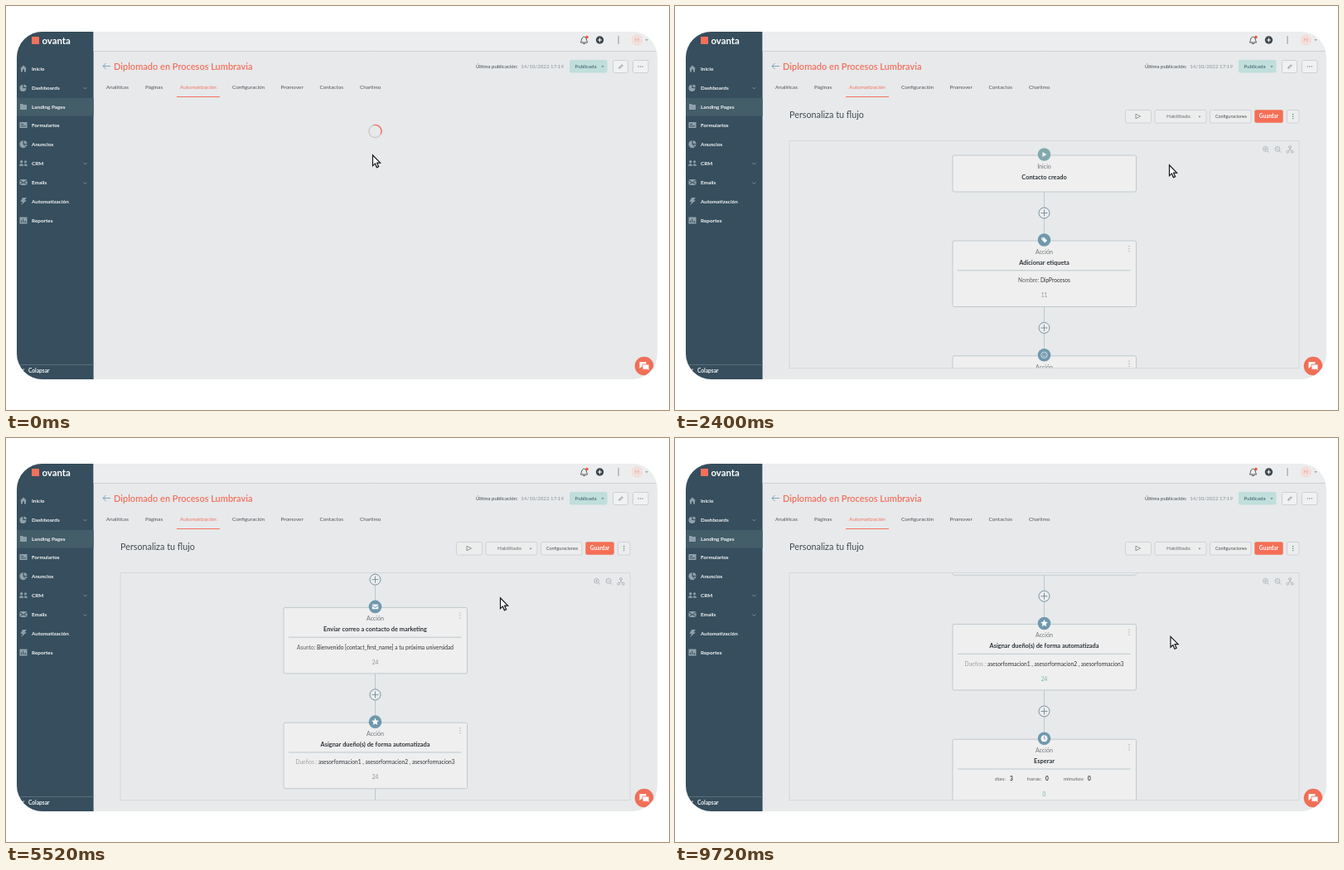
Write an HTML page with a canvas that moves like this. It is 800 by 487 pixels and loops after 9.8 s.

```html
<!DOCTYPE html>
<html lang="es">
<head>
<meta charset="utf-8">
<style>
  html, body { margin: 0; width: 100%; height: 100%; overflow: hidden; background: #fff; }
  canvas { display: block; width: 800px; height: 487px; }
</style>
</head>
<body>
<canvas id="stage"></canvas>
<script>
const LOOP = 9800, LOADED = 240, WHEEL = 118.7, WHEEL_MS = 150;
const WHEEL_TIMES = [2700, 3980, 5140, 7130];
const ORANGE = '#f4705a', DARK = '#2e3338', GREY = '#71767b', BLUE = '#6f98ad', PALE = '#e7e9eb';
const CX = 445.5;

// Cursor tip: time, x, y
const CURSOR = [
  [0, 442, 179], [400, 442, 179], [520, 453, 181], [760, 560, 187], [1000, 596, 191],
  [5000, 596, 191], [5400, 596, 192], [6700, 596, 192], [7120, 597.3, 212.6], [7680, 597.5, 222],
  [8320, 597.5, 222], [8640, 597.5, 226], [8920, 597.5, 228], [9120, 597.5, 229.5],
  [9400, 597.5, 231.5], [9680, 597.5, 231.5], [9720, 597.5, 238.6], [LOOP, 597.5, 238.6]
];

const MENU = [
  ['Inicio', 75.5, 'M-4 0L0 -4L4 0H3V4H1V1H-1V4H-3V0Z'],
  ['Dashboards', 98.5, 'M-.6 -3.5V.6H3.5A4 4 0 1 1 -.6 -3.5ZM.6 -4A4 4 0 0 1 4 -.6H.6Z'],
  ['Landing Pages', 121.5, 'M-4 -3.5H-1L0 -2.5H4V3.5H-4Z'],
  ['Formularios', 143.5, 'M-4.5 -3.5H4.5V3.5H-4.5ZM-3 -1.5V-.5H0V-1.5ZM-3 .8V1.8H3V.8Z'],
  ['Anuncios', 166.5, 'M-.5 -4.5V0L3 3.5A4.6 4.6 0 1 1 -.5 -4.5ZM.7 -4.5A4.6 4.6 0 0 1 4.6 -.6H.7ZM1 .5H4.6A4.6 4.6 0 0 1 3.5 3Z'],
  ['CRM', 189.5, 'M-4 -1.7A1.7 1.7 0 1 1 -.6 -1.7A1.7 1.7 0 1 1 -4 -1.7ZM1 -1.7A1.5 1.5 0 1 1 4 -1.7A1.5 1.5 0 1 1 1 -1.7ZM-5 3.3C-5 0 .3 0 .3 3.3ZM1.2 3.3V1C3 .3 5 1 5 3.3Z'],
  ['Emails', 212.5, 'M-4.5 -3.5L0 .3L4.5 -3.5ZM-4.5 -2.3V3L-1.6 .2ZM4.5 -2.3V3L1.6 .2ZM-4 3.5L-1 .8L0 1.6L1 .8L4 3.5Z'],
  ['Automatización', 235.5, 'M-1 -4.5H4L1.5 -1.2H4L-3 4.8L-.8 .6H-3.5Z'],
  ['Reportes', 258.5, 'M-4.5 -4H4.5V4H-4.5ZM-3 0V2.5H-2V0ZM-.8 -2V2.5H.2V-2ZM1.5 .8V2.5H3V.8Z']
];
const TABS = [['Analíticas', 121], ['Páginas', 168], ['Automatización', 210], ['Configuración', 273],
  ['Promover', 331.5], ['Contactos', 378.5], ['Charlimo', 427]];

const GLYPH = {
  play: 'M-2 -3L3 0L-2 3Z',
  tag: 'M-3.6 -2.6L-.4 -3.2L3.6 .8L.8 3.6L-3.2 -.4Z',
  mail: 'M-3.8 -2.2L0 .6L3.8 -2.2V-2.8H-3.8ZM-3.8 -1.1V2.8H3.8V-1.1L0 1.7Z'
};
const CARDS = [
  { y: 179, kind: 'play', head: 'Inicio', title: 'Contacto creado' },
  { kind: 'tag', title: 'Adicionar etiqueta', parts: [['Nombre: ', '#5b6065'], ['DipProcesos', DARK]], count: '11' },
  { kind: 'smile', title: 'Crear oportunidad', parts: [['Nombre: ', '#5b6065'], ['Diplomado en Procesos', DARK]], count: '11' },
  { kind: 'mail', title: 'Enviar correo a contacto de marketing',
    parts: [['Asunto: ', '#5b6065'], ['Bienvenido [contact_first_name] a tu próxima universidad', DARK]], count: '24' },
  { kind: 'star', title: 'Asignar dueño(s) de forma automatizada',
    parts: [['Dueños : ', '#9ca1a5'], ['asesorformacion1 , asesorformacion2 , asesorformacion3', DARK]], count: '24' },
  { kind: 'clock', title: 'Esperar', waits: [['días:', 386, '3', 404], ['horas:', 425, '0', 447], ['minutos:', 469, '0', 498]], count: '0' }
];
CARDS.forEach((card, i) => { if (i) card.y = 282 + (i - 1) * 138.75; });

const canvas = document.getElementById('stage');
const ctx = canvas.getContext('2d');
const dpr = window.devicePixelRatio || 1;
canvas.width = 800 * dpr;
canvas.height = 487 * dpr;

const clamp = v => Math.max(0, Math.min(1, v));
const easeOut = u => 1 - (1 - u) ** 2;

function text(str, x, y, size, color, { weight = 400, align = 'left' } = {}) {
  ctx.font = `${weight} ${size}px Lato, "Open Sans", sans-serif`;
  ctx.textAlign = align;
  ctx.fillStyle = color;
  ctx.fillText(str, x, y + size * 0.35);
  return ctx.measureText(str).width;
}

function rect(x, y, w, h, fill, stroke, radius = 0) {
  ctx.beginPath();
  ctx.roundRect(x, y, w, h, radius);
  if (fill) { ctx.fillStyle = fill; ctx.fill(); }
  if (stroke) { ctx.strokeStyle = stroke; ctx.lineWidth = 1; ctx.stroke(); }
}

function line(color, width, ...points) {
  ctx.beginPath();
  for (let i = 0; i < points.length; i += 2) ctx.lineTo(points[i], points[i + 1]);
  ctx.strokeStyle = color;
  ctx.lineWidth = width;
  ctx.stroke();
}

function circle(x, y, r, fill, stroke, width = 1) {
  ctx.beginPath();
  ctx.arc(x, y, r, 0, Math.PI * 2);
  if (fill) { ctx.fillStyle = fill; ctx.fill(); }
  if (stroke) { ctx.strokeStyle = stroke; ctx.lineWidth = width; ctx.stroke(); }
}

function shape(d, x, y, fill, stroke, width = 1) {
  ctx.save();
  ctx.translate(x, y);
  const path = new Path2D(d);
  if (fill) { ctx.fillStyle = fill; ctx.fill(path, 'evenodd'); }
  if (stroke) { ctx.strokeStyle = stroke; ctx.lineWidth = width; ctx.stroke(path); }
  ctx.restore();
}

const caret = (x, y, color) => shape('M-1.5 -.7H1.5L0 1Z', x, y, color);
const chevron = (x, y, color) => line(color, 0.8, x - 2, y - 1, x, y + 1, x + 2, y - 1);

function dots(x, y, dx, dy, color) {
  for (let i = -1; i <= 1; i++) circle(x + i * dx, y + i * dy, 0.7, color);
}

function plus(x, y, arm, color, width) {
  line(color, width, x - arm, y, x + arm, y);
  line(color, width, x, y - arm, x, y + arm);
}

function drawSidebar() {
  rect(13, 31, 92.6, 419, '#364e5d');
  rect(13, 111, 92.6, 21.5, '#435d69');
  rect(31, 37, 9, 9, ORANGE);
  text('ovanta', 43.5, 42, 11.4, '#fff', { weight: 700 });
  for (const [label, y, icon] of MENU) {
    shape(icon, 21, y, '#8fa0aa');
    text(label, 31, y, 6.4, '#f4f6f7', { weight: 700 });
  }
  for (const y of [99, 190, 213.5]) chevron(95.5, y, '#8fa0aa');
  line('#5a707c', 1, 13, 432.5, 105.6, 432.5);
  line('#fff', 1, 22, 437.5, 19, 440, 22, 442.5);
  text('Colapsar', 27, 440, 6.6, '#f4f6f7', { weight: 700 });
}

function drawHeader() {
  rect(105.6, 31, 680.4, 23, '#ecedee');
  line('#cfd1d3', 1, 105.6, 54.5, 786, 54.5);
  shape('M-4.2 3C-2.6 1.5 -3.6 -3.6 0 -3.8C3.6 -3.6 2.6 1.5 4.2 3ZM-1.2 4.5H1.2', 697.5, 41, null, '#4b5359');
  circle(701, 37.5, 1.7, '#f0503c');
  circle(716.5, 41, 4.7, '#3d464c');
  plus(716.5, 41, 2.4, '#fff', 1.1);
  line('#8f9498', 1, 739, 36, 739, 46);
  circle(761.5, 41, 6.8, '#f2dfda');
  text('FE', 761.5, 41, 5.2, '#efa493', { align: 'center' });
  caret(773, 41, '#7b8084');

  line('#7ba5b8', 1, 126, 72.5, 117, 72.5);
  line('#7ba5b8', 1, 120.5, 69, 117, 72.5, 120.5, 76);
  text('Diplomado en Procesos Lumbravia', 130, 73, 11, ORANGE, { weight: 600 });
  text('Última publicación:', 567, 73, 6, '#51565b', { weight: 500 });
  text('14/10/2022 17:19', 673, 73, 6.2, '#8b9094', { align: 'right' });
  rect(680, 65, 45.5, 15.5, '#c0dedb', null, 2);
  text('Publicada', 699.5, 72.5, 6, '#557a82', { weight: 700, align: 'center' });
  caret(720, 73, '#557a82');
  rect(732.5, 65.5, 18, 15, '#f0f1f1', '#cdd1d4', 2);
  shape('M-2.4 1.8L1.4 -2A1 1 0 0 1 2.6 -.8L-.4 2.2A.8 .8 0 0 1 -1.4 1L1 -1.2', 741.5, 73, null, '#7c8388', 0.7);
  rect(756.5, 65.5, 18.5, 15, '#f0f1f1', '#cdd1d4', 2);
  dots(765.7, 73, 2.5, 0, '#7c8388');

  for (const [label, x] of TABS) text(label, x, 98, 6.4, x === 210 ? ORANGE : '#50555a');
  line(ORANGE, 1, 206, 109.5, 258, 109.5);
}

function drawChatButton() {
  circle(770, 434, 11.3, '#f06f57');
  shape('M-5.5 -5H2.5V1H-3L-5.5 3Z', 770, 434, '#fff');
  shape('M-2 -2H6V6L4 4.2H-2Z', 770, 434, '#fff', '#f06f57', 0.9);
}

function drawSpinner(t) {
  const turn = t / 1000 * Math.PI * 2;
  circle(CX, 151, 7.6, null, '#cfc3c2', 1.3);
  ctx.beginPath();
  ctx.arc(CX, 151, 7.6, turn - 1.8, turn + 0.5);
  ctx.strokeStyle = ORANGE;
  ctx.lineWidth = 1.4;
  ctx.stroke();
}

function drawToolbar() {
  const button = (x, w) => rect(x + 0.5, 125.5, w, 15.5, '#eceded', '#cfd3d5', 2);
  text('Personaliza tu flujo', 138, 131, 10.8, '#444a50');
  button(543, 31);
  shape('M-2.5 -2.8L3 0L-2.5 2.8Z', 558.5, 133, null, '#7d8388', 0.8);
  button(578.5, 62);
  text('Habilitado', 607.5, 133, 6.4, '#686d72', { align: 'center' });
  caret(633, 133.5, '#7c8186');
  button(645, 49.5);
  text('Configuraciones', 671, 133, 5.4, '#4c5156', { align: 'center' });
  rect(699.3, 125.3, 34.4, 15.5, '#f56f56', null, 2);
  text('Guardar', 716.5, 133, 6.5, '#fff', { weight: 700, align: 'center' });
  button(738, 14.5);
  dots(745.7, 133, 0, 2.6, '#5c6267');
}

function drawBadge(kind, y) {
  circle(CX, y, 7.8, kind === 'play' ? '#81a9ad' : BLUE);
  if (GLYPH[kind]) shape(GLYPH[kind], CX, y, '#f4f6f7');
  if (kind === 'tag') circle(CX - 1.9, y - 1.7, 0.6, BLUE);
  if (kind === 'star') {
    ctx.beginPath();
    for (let i = 0; i < 10; i++) {
      const r = i % 2 ? 2.1 : 4.7, a = i * Math.PI / 5 - Math.PI / 2;
      ctx.lineTo(CX + r * Math.cos(a), y + r * Math.sin(a));
    }
    ctx.fillStyle = '#fff';
    ctx.fill();
  }
  if (kind === 'smile') {
    circle(CX, y, 3.7, null, '#dbe5ea', 0.9);
    circle(CX - 1.3, y - 0.9, 0.5, '#dbe5ea');
    circle(CX + 1.3, y - 0.9, 0.5, '#dbe5ea');
    shape('M-1.8 .8Q0 2.8 1.8 .8', CX, y, null, '#dbe5ea', 0.8);
  }
  if (kind === 'clock') {
    circle(CX, y, 4, '#f4f6f7');
    line(BLUE, 0.9, CX, y - 2.5, CX, y, CX + 1.8, y + 1);
  }
}

function drawCard(card, t) {
  const y = card.y, first = card.kind === 'play', height = first ? 44 : 79.5;
  const plusY = y + (first ? 70.5 : 106);
  const center = { align: 'center' };
  line('#bac7ce', 1, CX, y + height, CX, plusY + 33);
  circle(CX, plusY, 6.5, '#ecedee', '#7a93a0');
  plus(CX, plusY, 4, '#7a93a0', 1);

  ctx.globalAlpha = 0.4 + 0.6 * clamp((t - LOADED) / 760);
  rect(335, y + 1, 221.5, height, '#efefef', '#bfc9ce', 2);
  text(card.head || 'Acción', CX, y + 14.5, 7.1, GREY, center);
  text(card.title, CX, y + 27, 7.4, DARK, { weight: 700, align: 'center' });
  if (!first) {
    dots(548, y + 10.5, 0, 3, '#a3a9ad');
    line('#bcc7cd', 1, 341, y + 36.8, 549.5, y + 36.8);
    drawDetails(card, y + 49, t);
    const tinted = t < 1000 || t > WHEEL_TIMES[3];
    text(card.count, CX, y + 67, 6.6, tinted ? '#72b5ab' : '#8f9498', center);
  }
  ctx.globalAlpha = 1;
  drawBadge(card.kind, y);
}

function drawDetails({ parts, waits }, y, t) {
  if (waits) {
    for (const [label, x, value, valueX] of waits) {
      text(label, x, y, 6.5, '#5b6065');
      text(value, valueX, y, 6.5, DARK, { weight: 700 });
    }
    return;
  }
  const shown = t < 700 ? parts.slice(0, 1) : parts;
  ctx.font = '400 6.6px Lato, "Open Sans", sans-serif';
  let x = CX - shown.reduce((sum, [str]) => sum + ctx.measureText(str).width, 0) / 2;
  for (const [str, color] of shown) x += text(str, x, y, 6.6, color);
}

function drawFlow(t) {
  const scroll = WHEEL * WHEEL_TIMES.reduce((sum, at) => sum + easeOut(clamp((t - at) / WHEEL_MS)), 0);
  ctx.save();
  ctx.beginPath();
  ctx.rect(138, 162, 615, 275);
  ctx.clip();
  ctx.translate(0, -scroll);
  for (const card of CARDS) drawCard(card, t);
  ctx.restore();
  rect(138, 162.5, 615, 274, null, '#d5d8da');

  const tint = '#a6abaf';
  for (const x of [712.5, 727]) {
    circle(x, 172.3, 2.9, null, tint, 0.8);
    line(tint, 0.9, x + 2, 174.4, x + 4, 176.5);
    line(tint, 0.7, x - 1.5, 172.3, x + 1.5, 172.3);
  }
  line(tint, 0.7, 712.5, 170.8, 712.5, 173.8);
  line(tint, 0.8, 742, 171, 742, 173, 739.5, 175);
  line(tint, 0.8, 742, 173, 744.5, 175);
  for (const [x, y] of [[742, 170], [739.2, 175.7], [744.8, 175.7]]) circle(x, y, 1.4, PALE, tint, 0.8);
}

function drawCursor(t) {
  const i = CURSOR.findIndex(key => key[0] > t);
  const [t0, x0, y0] = CURSOR[i - 1], [t1, x1, y1] = CURSOR[i];
  const u = (t - t0) / (t1 - t0);
  shape('M.5 .8V13.6L3.4 10.9L5.4 15.6L7.6 14.7L5.6 10.1H9.6Z',
    x0 + (x1 - x0) * u, y0 + (y1 - y0) * u, '#fff', '#15181b', 1.2);
}

function draw(t) {
  ctx.setTransform(dpr, 0, 0, dpr, 0, 0);
  ctx.fillStyle = '#fff';
  ctx.fillRect(0, 0, 800, 487);
  ctx.save();
  ctx.beginPath();
  ctx.roundRect(13, 31, 773, 419, 31);
  ctx.clip();
  rect(13, 31, 773, 419, PALE);
  drawSidebar();
  drawHeader();
  if (t < LOADED) {
    drawSpinner(t);
  } else {
    drawToolbar();
    drawFlow(t);
  }
  drawChatButton();
  drawCursor(t);
  ctx.restore();
}

const start = performance.now();
function tick() {
  const t = (performance.now() - start) % LOOP;
  draw(Math.floor(t / 40) * 40);
  requestAnimationFrame(tick);
}
tick();
</script>
</body>
</html>
```
